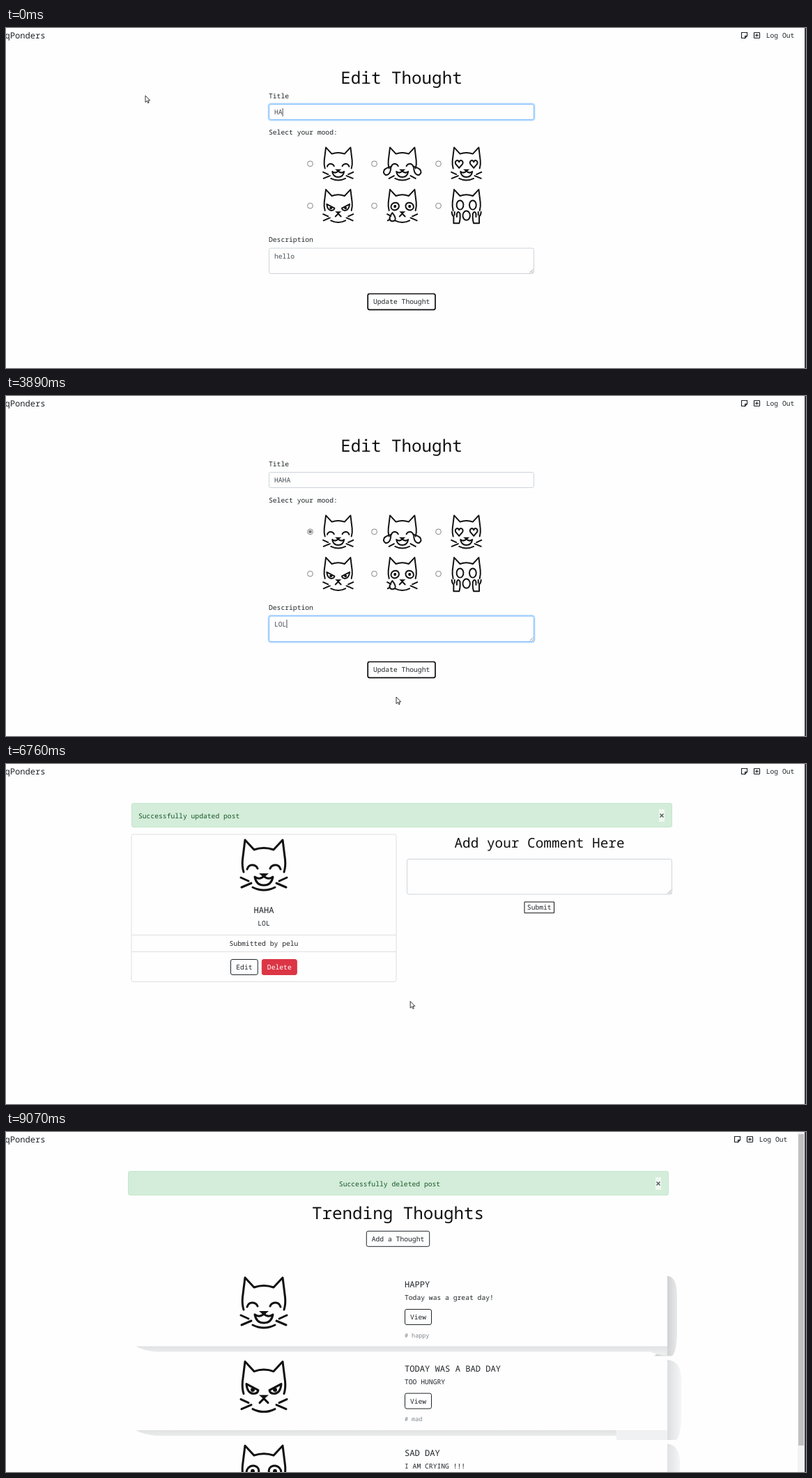
Animation, 1148 px wide and 488 px high, one loop 9660 ms. Source, as an HTML page with a canvas:

```html
<!DOCTYPE html>
<html lang="en">
<head>
<meta charset="utf-8">
<title>Mood journal</title>
<style>
html, body { margin: 0; width: 100%; height: 100%; overflow: hidden; background: #fefefe; }
canvas { display: block; width: 1148px; height: 488px; }
</style>
</head>
<body>
<canvas id="stage" width="1148" height="488"></canvas>
<script>
const ctx = document.getElementById('stage').getContext('2d');
const LOOP = 9660;
const PAPER = '#fefefe', INK = '#212529', FIELD = '#495057', GREEN = '#28a745', LINE = '#ced4da';
const BODY = 9.7, LARGE = 12.12, SMALL = 8.45, HEAD = 24.24;

// Screen updates: first time, last time, count
const bursts = [[0, 0, 1], [130, 1090, 7], [1220, 2230, 8], [2350, 2350, 1], [3060, 4040, 8],
  [4160, 4460, 3], [5180, 5180, 1], [6300, 7290, 8], [7560, 8110, 5], [8650, 8650, 1], [8950, 9070, 2]];

// Pointer waypoints: time, x, y
const route = [[0, 200, 97], [290, 200, 97], [610, 330, 160], [930, 530, 213], [1090, 569, 217],
  [1220, 531.5, 188], [1370, 455, 191], [1510, 436, 192], [1660, 436, 192], [1950, 372, 270],
  [2230, 422, 326], [2350, 246, 321], [3340, 246, 321], [3620, 450, 410], [3760, 560, 432],
  [3900, 598, 410], [4040, 575, 392], [4160, 640, 415], [4310, 800, 435], [4460, 880, 439],
  [6300, 872, 435], [6583, 690, 375], [6866, 470, 306], [7007, 393, 286], [7290, 393, 286],
  [7560, 430, 290], [7835, 740, 312], [7973, 860, 321], [8110, 877, 322.5],
  [8650, 877, 322.5], [8950, 1109, 474]];

function quantise(t) {
  const [from, to, n] = bursts.filter(b => b[0] <= t).pop();
  if (n === 1) return from;
  const step = (to - from) / (n - 1);
  return from + step * Math.min(n - 1, Math.floor((t - from) / step + 0.001));
}

function pointerAt(t) {
  const i = route.findIndex(p => p[0] > t + 0.01);
  if (i < 0) return route[route.length - 1].slice(1);
  const [ta, xa, ya] = route[i - 1], [tb, xb, yb] = route[i];
  const k = (t - ta) / (tb - ta);
  // Rests between bursts hold the last place
  if (bursts.some(b => b[0] === tb) && t < tb) return [xa, ya];
  return [xa + (xb - xa) * k, ya + (yb - ya) * k];
}

// y is the middle of the capital letters
function text(s, x, y, size = BODY, color = INK, align = 'left') {
  ctx.font = `${size}px "Noto Sans Mono", "DejaVu Sans Mono", monospace`;
  ctx.textAlign = align;
  ctx.fillStyle = color;
  ctx.fillText(s, x, y + size * 0.357);
}
const centre = (s, x, y, size, color) => text(s, x, y, size, color, 'center');

function box(x, y, w, h, { fill, stroke, lw = 1, r = 2.5 } = {}) {
  ctx.beginPath();
  ctx.roundRect(x, y, w, h, r);
  if (fill) { ctx.fillStyle = fill; ctx.fill(); }
  if (stroke) { ctx.strokeStyle = stroke; ctx.lineWidth = lw; ctx.stroke(); }
}

function strokePath(d, color, lw) {
  ctx.strokeStyle = color;
  ctx.lineWidth = lw;
  ctx.stroke(new Path2D(d));
}

function field(x, y, w, h, state, area) {
  if (state === 'focus') box(x - 1, y - 1, w + 2, h + 2, { stroke: '#bfdeff', lw: 2, r: 3.5 });
  box(x, y, w, h, { fill: PAPER, stroke: { focus: '#80bdff', valid: GREEN }[state] || LINE });
  if (area) {
    const a = x + w - 1, b = y + h - 1;
    strokePath(`M${a - 5} ${b}L${a} ${b - 5}M${a - 2} ${b}L${a} ${b - 2}`, '#777', 0.7);
  }
  if (state === 'valid') {
    const a = x + w - 11.5, b = y + 11.5;
    strokePath(`M${a - 4} ${b}L${a - 1} ${b + 3}L${a + 4.5} ${b - 3.5}`, GREEN, 2.1);
  }
}

function button(label, x, y, w, h, opts) {
  box(x, y, w, h, { stroke: '#212529', ...opts });
  centre(label, x + w / 2, y + h / 2, BODY, (opts && opts.ink) || INK);
}

function caret(x, y) {
  ctx.fillStyle = FIELD;
  ctx.fillRect(x, y, 1, 12);
}

// Cat faces, drawn around their middle
const mirror = draw => { draw(); ctx.save(); ctx.scale(-1, 1); draw(); ctx.restore(); };
const line = d => ctx.stroke(new Path2D(d));
function oval(x, y, rx, ry, turn = 0, solid) {
  ctx.beginPath();
  ctx.ellipse(x, y, rx, ry, turn, 0, Math.PI * 2);
  solid ? ctx.fill() : ctx.stroke();
}

const happyEye = () => line('M-24 6Q-22 0 -17 0Q-11 0 -9 5');
const whiskers = () => line('M-33 18L-22 23M-32 32L-18 26');
const nose = () => ctx.fill(new Path2D('M-7 12H7L0 18Z'));
const grin = () => line('M-13 17Q-6 22 0 16Q6 22 13 17Q11 29 0 29Q-11 29 -13 17M-16 32Q0 40 16 32');
const frown = () => line('M-6 23L0 17L6 23M-16 32Q0 40 16 32');

const moods = {
  happy() { mirror(happyEye); mirror(whiskers); nose(); grin(); },
  joy() {
    mirror(happyEye);
    mirror(() => line('M-25 6Q-42 10 -41 19Q-38 27 -31 23Q-25 19 -25 6M-29 32L-18 26'));
    nose(); grin();
  },
  love() {
    mirror(() => line('M-16 9L-23 1Q-26 -4 -22 -7Q-18 -9 -16 -4Q-14 -9 -10 -7Q-6 -4 -9 1Z'));
    mirror(whiskers); nose(); grin();
  },
  mad() {
    mirror(() => {
      line('M-25 -4L-8 5Q-9 10 -15 10Q-24 9 -25 -4Z');
      oval(-16, 4.5, 3, 3, 0, true);
    });
    mirror(whiskers); nose(); frown();
  },
  sad() {
    mirror(() => { oval(-16, 1, 9, 8, -0.5); oval(-16, 1, 3, 3.5, 0, true); });
    ctx.fillStyle = '#111';
    line('M-33 18L-25 22M-32 32L-27 29M18 26L32 32M22 23L33 18');
    line('M-22 15Q-30 26 -27 31Q-22 36 -16 31Q-13 26 -22 15Z');
    nose(); frown();
  },
  scream() {
    mirror(() => {
      oval(-14, -2, 7.5, 10);
      line('M-32 13Q-32 20 -28 23V38H-16Q-13 30 -14 17Q-18 9 -21 17V24M-26 13V20');
    });
    oval(0, 21, 8, 10);
  }
};

function cat(mood, x, y, scale = 1) {
  ctx.save();
  ctx.translate(x, y);
  ctx.scale(scale, scale);
  ctx.strokeStyle = ctx.fillStyle = '#111';
  ctx.lineWidth = 3;
  ctx.lineCap = ctx.lineJoin = 'round';
  line('M-29 10Q-31.5 2 -30.5 -8L-27 -36L-14 -22Q0 -27 14 -22L27 -36L30.5 -8Q31.5 2 29 10');
  moods[mood]();
  ctx.restore();
}

function nav(dx = 0) {
  text('qPonders', -1.5, 11, LARGE);
  const x = 1055.5 + dx;
  strokePath(`M${x + 5} 14.5H${x}V6.5H${x + 8}V11.5L${x + 5} 14.5V11.5H${x + 8}`, INK, 1.2);
  box(x + 18, 6.5, 8, 8, { stroke: INK, lw: 1.2, r: 0.8 });
  strokePath(`M${x + 22} 8.2V12.8M${x + 19.7} 10.5H${x + 24.3}`, INK, 1.2);
  text('Log Out', 1090.7 + dx, 10.7);
}

function alertBar(x) {
  box(x + 0.5, 56.5, 775, 34, { fill: '#d4edda', stroke: '#c3e6cb' });
  ctx.fillStyle = '#eff8f1';
  ctx.fillRect(x + 757, 65, 8, 18);
  strokePath(`M${x + 758.5} 71.5l5 5m0 -5l-5 5`, '#5c635e', 1.6);
}

function editPage(t) {
  const valid = t >= 4160, dy = valid ? 15 : 0;
  const picked = t > 1600, writing = t >= 2350 && !valid;
  const title = t < 130 ? 'HA' : t < 290 ? 'HAH' : 'HAHA';

  centre('Edit Thought', 567.5, 71.5, HEAD, '#111');
  text('Title', 377, 97.5);
  field(377.5, 109.5, 380, 22, valid ? 'valid' : picked ? '' : 'focus');
  text(title, 385, 121, BODY, FIELD);
  if (!picked) caret(385 + title.length * 5.82, 115);
  if (valid) text('Looks good!', 377, 141.5, SMALL, GREEN);

  text('Select your mood:', 377, 149.5 + dy);
  Object.keys(moods).forEach((mood, i) => {
    const x = 436.5 + (i % 3) * 92, y = 194.8 + dy + (i > 2 ? 60.4 : 0);
    ctx.strokeStyle = ctx.fillStyle = '#767676';
    ctx.lineWidth = 0.9;
    oval(x, y, 3.9, 3.9);
    if (picked && !i) oval(x, y, 2.3, 2.3, 0, true);
    cat(mood, x + 40.2, y + 0.2, 0.655);
  });

  text('Description', 377, 303.7 + dy);
  field(377.5, 316 + dy, 380, 36.5, valid ? 'valid' : writing ? 'focus' : '', true);
  const note = t < 3059 ? 'hello' : 'LOL'.slice(0, 1 + Math.floor((t - 3059) / 140));
  const selected = writing && note === 'hello';
  if (selected) {
    ctx.fillStyle = '#3390ff';
    ctx.fillRect(385, 320, 29, 13.5);
  }
  text(note, 385, 327.5 + dy, BODY, selected ? '#fff' : FIELD);
  if (writing && !selected) caret(385 + note.length * 5.82, 321);
  if (valid) text('Looks good!', 377, 377.5, SMALL, GREEN);

  const by = 381.5 + dy * 2;
  if (valid) box(518, by - 1.2, 99, 25.4, { stroke: '#a9c9f5', lw: 2, r: 4 });
  button('Update Thought', 519.2, by, 96.8, 22.8, { stroke: '#0c0d10', lw: 1.7 });
}

function postPage(t) {
  alertBar(180);
  text('Successfully updated post', 190, 74.3, BODY, '#155724');
  box(180, 101, 380, 211.5, { stroke: '#dfdfdf' });
  strokePath('M180 245.5H560M180 269.5H560', '#dfdfdf', 1);
  cat('happy', 370, 145);
  centre('HAHA', 370, 210, LARGE);
  centre('LOL', 370, 228.5);
  centre('Submitted by pelu', 370, 258);
  button('Edit', 322.5, 280.5, 38.8, 22);
  const pressed = t > 7000;
  if (pressed) box(366, 279.5, 52.5, 24, { stroke: '#eda0a8', lw: 2.4, r: 3.5 });
  const red = pressed ? '#c82333' : '#dc3545';
  button('Delete', 367.3, 280.5, 50, 22, { fill: red, stroke: red, ink: '#fff' });

  centre('Add your Comment Here', 765.5, 113, 19.39, '#111');
  field(575.5, 136.5, 380, 50.5, '', true);
  button('Submit', 744, 198, 42.5, 15.8, { r: 0, stroke: '#111' });
}

function shadow(top, width, near, far) {
  const bottom = top + 106;
  const side = ctx.createLinearGradient(949, 0, 949 + width, 0);
  side.addColorStop(0, near);
  side.addColorStop(1, far);
  ctx.fillStyle = side;
  ctx.fill(new Path2D(`M949 ${top + 5}Q${949 + width} ${top + 6} ${949 + width} ${top + 34}` +
    `V${bottom - 15}Q${949 + width - 2} ${bottom + 13} ${949 + width - 8} ${bottom + 14}H930L949 ${bottom}Z`));
  const under = ctx.createLinearGradient(0, bottom, 0, bottom + 9);
  under.addColorStop(0, '#e1e2e3');
  under.addColorStop(1, '#ebecec');
  ctx.fillStyle = under;
  ctx.fill(new Path2D(`M186 ${bottom}H949V${bottom + 14}Q935 ${bottom + 13} 925 ${bottom + 8}H215Q197 ${bottom + 6} 186 ${bottom}Z`));
}

function listPage() {
  alertBar(175);
  centre('Successfully deleted post', 550.5, 74.3, BODY, '#155724');
  centre('Trending Thoughts', 562.5, 116.5, HEAD, '#111');
  button('Add a Thought', 517.3, 142.3, 90.4, 22);
  shadow(201.5, 14, '#cfd1d3', '#e8e9ea');
  shadow(322, 20, '#dcdfe1', '#f4f5f6');
  shadow(442.5, 18, '#e0e2e4', '#f3f4f5');
  ctx.fillStyle = '#f0f1f2';
  ctx.fillRect(876, 428, 73, 14);
  [['happy', 'HAPPY', 'Today was a great day!'],
   ['mad', 'TODAY WAS A BAD DAY', 'TOO HUNGRY'],
   ['sad', 'SAD DAY', 'I AM CRYING !!!']].forEach(([mood, title, note], i) => {
    const y = i * 120.6;
    cat(mood, 370, 245 + y);
    text(title, 572, 219 + y, LARGE);
    text(note, 572, 238 + y);
    button('View', 572.5, 254.5 + y, 38, 22);
    text('# ' + mood, 572, 291.5 + y, SMALL, '#7d838a');
  });
  ctx.fillStyle = '#f3f3f3';
  ctx.fillRect(1136, 0, 10, 488);
  ctx.fillStyle = '#c1c1c1';
  ctx.fillRect(1137, 3, 8, 447);
}

const shapes = {
  arrow: 'M0 0V9.6L2.3 7.5L3.8 10.8L5.2 10.1L3.8 7H6.7Z',
  hand: 'M-1 .8Q0 -.6 1 .8V4L5 5Q6 5.5 5.8 7L4.8 11H-.8L-4 6.8Q-3.5 5.2 -1 7Z'
};
function pointer(x, y, kind) {
  ctx.save();
  ctx.translate(x, y);
  if (kind === 'beam') {
    strokePath('M-2 -5H2M0 -5V5M-2 5H2', '#222', 0.9);
  } else {
    const p = new Path2D(shapes[kind]);
    ctx.fillStyle = '#fff';
    ctx.fill(p);
    ctx.strokeStyle = '#222';
    ctx.lineWidth = 0.9;
    ctx.stroke(p);
  }
  ctx.restore();
}

function pointerKind(t, x, y) {
  const over = (a, b, c, d) => x > a && x < c && y > b && y < d;
  if (t < 4160) {
    if (over(377, 109, 758, 132) || over(377, 316, 758, 353)) return 'beam';
    if (over(519, 381, 616, 404)) return 'hand';
  } else if (t >= 5180 && t < 8650 && over(322, 280, 418, 303)) return 'hand';
  return 'arrow';
}

function render(t) {
  t = quantise(t);
  ctx.fillStyle = PAPER;
  ctx.fillRect(0, 0, 1148, 488);
  nav(t >= 8650 ? -10 : 0);
  if (t < 5180) editPage(t);
  else if (t < 8650) postPage(t);
  else listPage();
  ctx.fillStyle = '#343a46';
  ctx.fillRect(1146, 0, 2, 488);
  if (t < 9070) {
    const [x, y] = pointerAt(t);
    pointer(x, y, pointerKind(t, x, y));
  }
}

ctx.textRendering = 'geometricPrecision';
const start = performance.now();
function frame() {
  render((performance.now() - start) % LOOP);
  requestAnimationFrame(frame);
}
frame();
</script>
</body>
</html>
```
